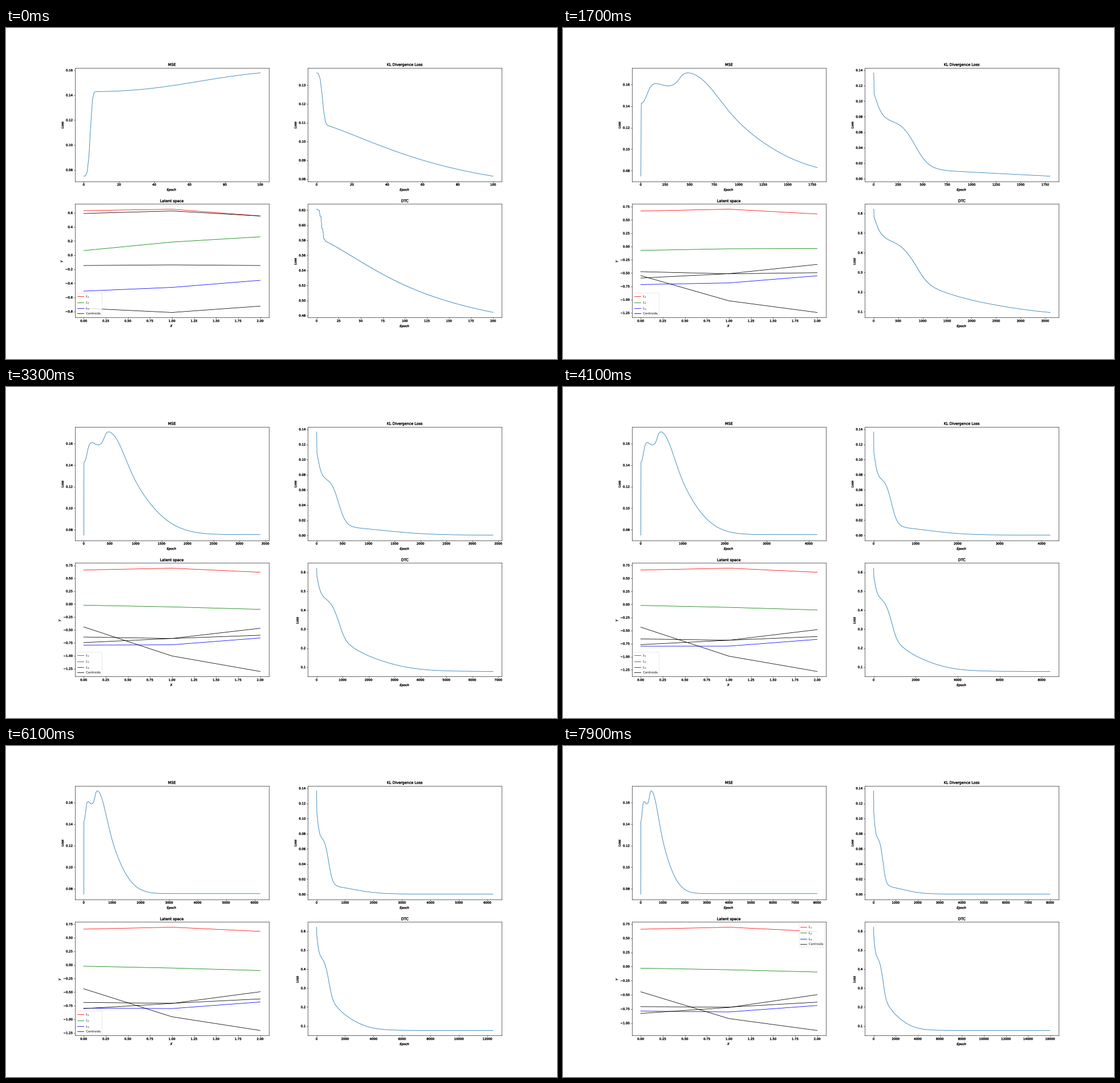
Animation of 966 by 580 pixels, one loop 8000 ms. Source, as a matplotlib script:

```python
import numpy as np
import matplotlib.pyplot as plt
from matplotlib.animation import FuncAnimation
from matplotlib.patheffects import Normal, Stroke

DPI = 38.64
FRAMES = 80
STEP = 100  # epochs per frame
LAST = FRAMES * STEP

plt.rcParams.update({
    "font.family": "DejaVu Sans",
    "text.hinting": "none",
    "axes.linewidth": 1.1,
    "xtick.major.width": 1.1,
    "ytick.major.width": 1.1,
})
HEAVY = [Stroke(linewidth=0.7, foreground="black")]

epochs = np.arange(LAST + 1)


def drop(tau, power):
    """Stretched exponential decay from 1 to 0."""
    return np.exp(-(epochs / tau) ** power)


def fall(center, width):
    """Logistic step from 1 down to 0."""
    return 1 / (1 + np.exp((epochs - center) / width))


def bump(center, width):
    return np.exp(-((epochs - center) / width) ** 2)


mse = (0.0755 + 0.097 * drop(1174.6, 2.2)
       - 0.0678 * drop(4.05, 4.2) - 0.0163 * drop(76.6, 2.6)
       - 0.0135 * fall(393, 27)
       + 0.0021 * bump(160, 70) + 0.014 * bump(600, 275))
kl = (0.0003 + 0.0266 * drop(3.7, 3.5) + 0.034 * drop(67.5, 1.33)
      + 0.064 * fall(422, 72) + 0.0125 * fall(1300, 450))
dtc = np.repeat(mse + 4 * kl, 2)

# Latent lines: colour, label, shape at the start, midway and at the end,
# then the late drift per 1000 epochs as (offset, slope along x)
MID, TAU = 1100, 790
LATENT = [
    ("r", "$L_1$", (.632, .653, .557), (.683, .716, .606), (.658, .694, .617), (0, 0)),
    ("g", "$L_2$", (.065, .186, .261), (-.167, -.025, .070), (-.030, -.058, -.098),
     (-.004, .0035)),
    ("b", "$L_3$", (-.511, -.458, -.357), (-.580, -.517, -.387), (-.788, -.803, -.689),
     (.004, -.004)),
    ("k", "Centroids", (.592, .628, .556), (-.225, -.277, -.319), (-.710, -.718, -.630),
     (-.011, .0042)),
    ("k", None, (-.147, -.138, -.147), (-.372, -.273, -.126), (-.829, -.724, -.498),
     (-.014, .0058)),
    ("k", None, (-.754, -.814, -.724), (-.730, -1.017, -1.058), (-.447, -.920, -1.130),
     (-.005, .0235)),
]
X = np.arange(3)


def settle(t, start, mid, end, drift):
    """Shape at epoch t: a drifting rest line plus a fading gap to it."""
    def rest(s):
        return np.array(end) + (drift[0] + drift[1] * X) * (s - LAST) / 1000

    def fade(s):
        return np.exp((STEP - s) / TAU)

    first = start - rest(STEP)
    kick = (mid - rest(MID)) / fade(MID)
    u = min((t - STEP) / (MID - STEP), 1)
    return rest(t) + (first + (kick - first) * u) * fade(t)


fig, axes = plt.subplots(2, 2, figsize=(966.01 / DPI, 580.01 / DPI), dpi=DPI)
fig.subplots_adjust(left=0.125, right=0.9, bottom=0.125, top=0.88,
                    wspace=0.2, hspace=0.2)
(ax_mse, ax_kl), (ax_lat, ax_dtc) = axes


def label(ax, title, xlabel="$Epoch$", ylabel="$Loss$"):
    for text in (ax.set_title(title), ax.set_xlabel(xlabel), ax.set_ylabel(ylabel)):
        text.set_path_effects(HEAVY)


label(ax_mse, "MSE")
label(ax_kl, "KL Divergence Loss")
label(ax_dtc, "DTC")
label(ax_lat, "Latent space", "$X$", "$Y$")

curves = [(ax.plot([], [])[0], data, rate)
          for ax, data, rate in ((ax_mse, mse, 1), (ax_kl, kl, 1), (ax_dtc, dtc, 2))]
lat_lines = [ax_lat.plot(X, start, color=color, label=name)[0]
             for color, name, start, *_ in LATENT]
legend = ax_lat.legend(loc="lower left", labelspacing=0.4, borderpad=0.35)
for entry in legend.get_texts():
    entry.set_path_effects([Normal()])


def place_legend(values):
    low, high = ax_lat.get_ylim()
    frac = (values - low) / (high - low)
    low_taken = frac[:, 0].min() < 0.218
    top_taken = frac[3, 2] > 0.78
    legend.set_loc("upper right" if low_taken and not top_taken else "lower left")


def update(k):
    n = STEP * (k + 1)
    for line, data, rate in curves:
        end = rate * n + 1
        line.set_data(np.arange(end), data[:end])
    values = np.array([settle(n, *shape) for _, _, *shape in LATENT])
    for line, row in zip(lat_lines, values):
        line.set_ydata(row)
    for ax in axes.flat:
        ax.relim()
        ax.autoscale_view()
        for tick in ax.get_xticklabels() + ax.get_yticklabels():
            tick.set_path_effects(HEAVY)
    place_legend(values)
    return []


anim = FuncAnimation(fig, update, frames=FRAMES, interval=100,
                     repeat=True, repeat_delay=0, blit=False)
plt.show()
```
